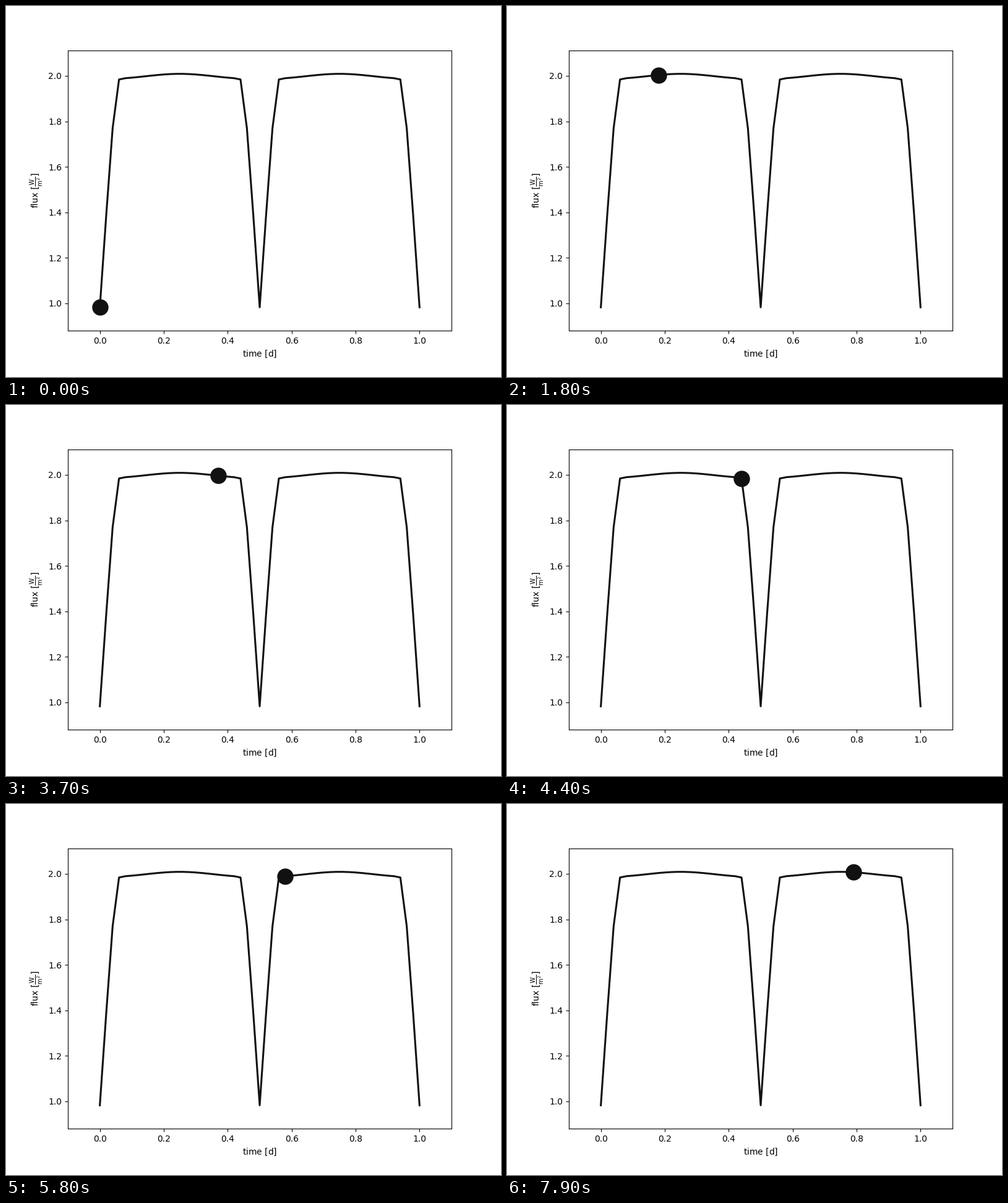
A matplotlib script that plays this animation: 800 px wide and 600 px high, repeating every 8000 ms.

```python
import numpy as np
import matplotlib.pyplot as plt
from matplotlib.animation import FuncAnimation

FRAMES, INTERVAL = 80, 100
STEP = 0.01  # days per frame
INK = "#111111"
ECLIPSE = [0.983, 1.388, 1.77, 1.984]  # flux at the samples from mid-eclipse outwards


def flux_at(k):
    """Flux of the k-th sample; the curve repeats every 25 samples."""
    k = k % 25
    dist = min(k, 25 - k)
    if dist < len(ECLIPSE):
        return ECLIPSE[dist]
    g = (1 + np.cos(4 * np.pi * 0.02 * dist)) / 2
    return 2.0088 - 0.0299 * g + 0.0065 * g**2


times = np.linspace(0, 1, 51)
fluxes = np.array([flux_at(k) for k in range(51)])

fig, ax = plt.subplots(figsize=(8, 6), dpi=100)
fig.subplots_adjust(left=0.125, right=0.9, bottom=0.125, top=0.88)
ax.plot(times, fluxes, color=INK, lw=2.2)
ax.margins(0.1)
ax.set_xlim(-0.1, 1.1)
ax.set_xlabel(r"time [$\mathrm{d}$]")
ax.set_ylabel(r"flux [$\mathrm{\frac{W}{m^{2}}}$]")
dot, = ax.plot(times[:1], fluxes[:1], "o", color=INK, ms=18)
ax.set_autoscale_on(False)


def update(i):
    t = i * STEP
    dot.set_data([t], [np.interp(t, times, fluxes)])
    return dot,


anim = FuncAnimation(fig, update, frames=FRAMES, interval=INTERVAL, repeat=True)
plt.show()
```
